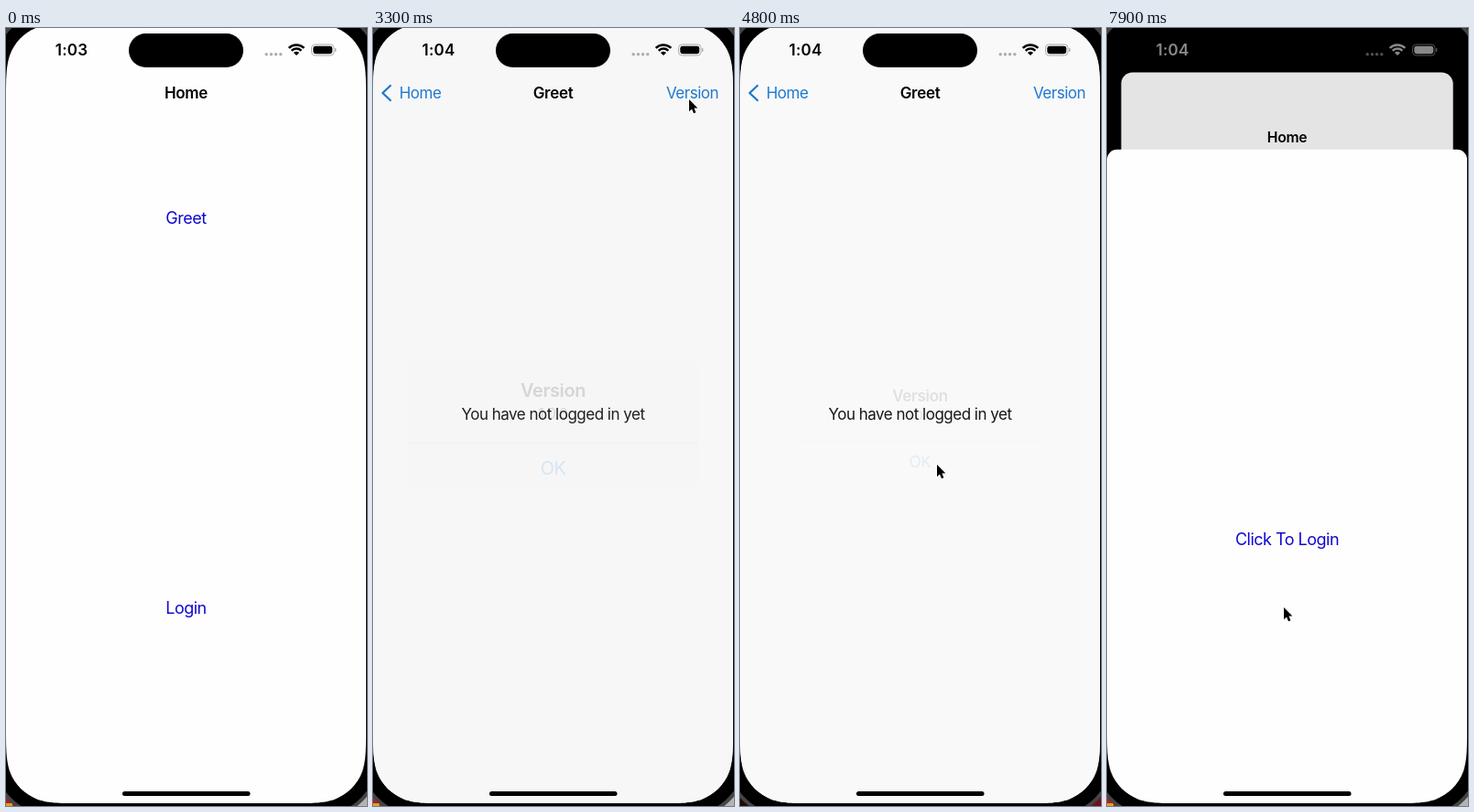
Animation, 394 px wide and 850 px high, one loop 8 s. Source, as an HTML page with a canvas:

```html
<!DOCTYPE html>
<html lang="en">
<head>
<meta charset="utf-8">
<title>Phone navigation</title>
<style>
  html, body { margin: 0; width: 100%; height: 100%; overflow: hidden; background: #000; }
  canvas { display: block; width: 100%; height: 100%; }
</style>
</head>
<body>
<canvas id="stage" width="394" height="850"></canvas>
<script>
const ctx = document.getElementById('stage').getContext('2d');
const W = 394, H = 850, LOOP = 8000, STEP = 100, MID = 196.5;
const BLACK = [0, 0, 0], BLUE = [18, 122, 222], LINK = [16, 8, 208], TINT_OFF = [112, 112, 118];
const PUSH = 1148, ALERT = 3265, DISMISS = 4586, POP = 6015, SHEET = 7675;

const gray = v => [v, v, v];
const PAPER = gray(254);
const lerp = (a, b, p) => a + (b - a) * p;
const mix = (a, b, p) => a.map((v, i) => lerp(v, b[i], p));
const css = c => `rgb(${c.map(Math.round)})`;
const ease = p => p * p * (3 - 2 * p);

// Critically damped spring running from 0 to 1
function spring(t, start) {
  const x = Math.max(0, t - start) / 1000 * 18.26;
  return 1 - (1 + x) * Math.exp(-x);
}

// Pointer path: time, x, y
const PATH = [
  [400, 410, 330], [1000, 196, 197], [1400, 196, 197], [1900, 156, 197],
  [2300, 156, 197], [3100, 345, 78], [3500, 345, 78], [4400, 215, 477],
  [4800, 215, 477], [5800, 57, 73], [6100, 57, 73], [6800, 145, 600],
  [7000, 145, 600], [7500, 193, 633], [8000, 193, 633]
];

function pointerAt(t) {
  const i = PATH.findIndex(p => p[0] >= t);
  if (i < 1) return null;
  const [a, b] = [PATH[i - 1], PATH[i]];
  const p = ease((t - a[0]) / (b[0] - a[0]));
  return [lerp(a[1], b[1], p), lerp(a[2], b[2], p)];
}

function box(x, y, w, h, r, fill) {
  ctx.beginPath();
  ctx.roundRect(x, y, w, h, r);
  if (fill) {
    ctx.fillStyle = fill;
    ctx.fill();
  }
}

// Rounded rectangle whose corners blend smoothly into the sides
function smoothBox(x, y, w, h, r) {
  const curve = [[1.529, 0], [1.088, 0], [0.868, 0], [0.631, 0.075], [0.373, 0.169]];
  const corner = (cx, cy, sx, sy, flip) => {
    let pts = [...curve, ...curve.map(([a, b]) => [b, a]).reverse()];
    if (flip) pts.reverse();
    pts = pts.map(([a, b]) => [cx + sx * a * r, cy + sy * b * r]);
    ctx.lineTo(...pts[0]);
    for (let i = 1; i < pts.length; i += 3) {
      ctx.bezierCurveTo(...pts[i], ...pts[i + 1], ...pts[i + 2]);
    }
  };
  ctx.beginPath();
  corner(x, y, 1, 1, true);
  corner(x + w, y, -1, 1, false);
  corner(x + w, y + h, -1, -1, true);
  corner(x, y + h, 1, -1, false);
  ctx.closePath();
}

function line(points, color, width) {
  ctx.beginPath();
  points.forEach(p => ctx.lineTo(...p));
  ctx.strokeStyle = color;
  ctx.lineWidth = width;
  ctx.lineCap = ctx.lineJoin = 'round';
  ctx.stroke();
}

function label(str, x, y, color, { size = 17, weight = 400, alpha = 1, space = -0.5 } = {}) {
  if (alpha <= 0) return;
  ctx.save();
  ctx.globalAlpha *= Math.min(1, alpha);
  ctx.font = `${weight} ${size}px Inter, sans-serif`;
  ctx.letterSpacing = `${space}px`;
  ctx.textAlign = 'center';
  ctx.fillStyle = css(color);
  ctx.fillText(str, x, y + size * 0.36);
  ctx.restore();
}

const title = (str, x, y, alpha = 1) =>
  label(str, x, y, BLACK, { weight: 600, space: -0.3, alpha });

const link = (str, x, y) => label(str, x, y, LINK, { size: 18 });

function homePage(x, fill) {
  ctx.fillStyle = css(fill);
  ctx.fillRect(0, -5, W, H + 5);
  link('Greet', x + MID, 208);
  link('Login', x + MID, 634);
}

function greetPage(x, fill) {
  ctx.fillStyle = css(fill);
  ctx.fillRect(x, -5, W, H + 5);
  label('You have not logged in yet', x + MID, 421.5, BLACK);
}

// p: visibility of the second page, q: position of the titles
function navBar(p, q, tint, y) {
  const homeX = lerp(MID, 51.5, q);
  title('Home', homeX, y, 1 - 3 * p * p);
  if (p < 0.001) return;
  label('Home', homeX, y, tint, { alpha: 1.3 * p * p });
  title('Greet', MID + 139 * (1 - q), y, 2.6 * p ** 3);
  label('Version', 348.5, y, tint, { alpha: 2 * p * p });
  ctx.globalAlpha = p ** 1.2;
  line([[19, 63], [10.5, 71], [19, 79]], css(tint), 2.3);
  ctx.globalAlpha = 1;
}

function alertBox(p, scale) {
  if (p < 0.005) return;
  ctx.save();
  ctx.globalAlpha = p * 0.96;
  ctx.translate(MID, 433.5);
  ctx.scale(scale, scale);
  box(-135, -61.5, 270, 123, 13, css(gray(238)));
  ctx.globalAlpha = p;
  ctx.fillStyle = css(gray(204));
  ctx.fillRect(-135, 17, 270, 1);
  title('Version', 0, -32);
  label('1.0.0', 0, -10.5, BLACK, { size: 13, space: -0.2 });
  label('OK', 0, 40.5, BLUE);
  ctx.restore();
}

function statusBar(clock, ink, faint) {
  const color = css(ink);
  label(clock, 71.5, 24, ink, { size: 17, weight: 600, space: 0.2 });
  for (let i = 0; i < 4; i++) box(282.5 + i * 5.2, 27, 3.4, 3.4, 1.7, css(faint));
  const apex = [317, 30], half = 0.8;
  for (const r of [11.6, 7.4]) {
    ctx.beginPath();
    ctx.arc(...apex, r, -Math.PI / 2 - half, -Math.PI / 2 + half);
    ctx.strokeStyle = color;
    ctx.lineWidth = 2.5;
    ctx.lineCap = 'butt';
    ctx.stroke();
  }
  ctx.beginPath();
  ctx.moveTo(...apex);
  ctx.arc(...apex, 4.3, -Math.PI / 2 - half, -Math.PI / 2 + half);
  ctx.fillStyle = color;
  ctx.fill();
  box(333.5, 18, 24.5, 12, 3.8);
  ctx.strokeStyle = css(faint);
  ctx.lineWidth = 1;
  ctx.stroke();
  box(335.3, 19.8, 20.9, 8.4, 2.4, color);
  box(359, 22, 1.4, 4, 0.7, css(faint));
}

function bezel(t) {
  const lit = t < 500 || (t >= 3300 && t < 4200) || t >= 7500;
  ctx.fillStyle = '#202020';
  ctx.fillRect(0, 0, W, H);
  ctx.fillStyle = lit ? '#b02018' : '#200a0a';
  ctx.fillRect(0, 800, 60, 50);
  ctx.fillStyle = lit ? '#b4b4b4' : '#701018';
  ctx.fillRect(334, 800, 60, 50);
  if (lit) {
    ctx.fillStyle = '#d8a030';
    ctx.fillRect(0, 847, 7, 3);
  }
  box(-19, -24, 431, 890, 75, '#444');
  box(-15, -20, 423, 882, 71, '#000');
}

function pointer(pos) {
  if (!pos) return;
  ctx.save();
  ctx.translate(...pos);
  ctx.beginPath();
  for (const p of [[0, 0], [0, 13.2], [3, 10.5], [5, 15.2], [7.4, 14.2], [5.4, 9.6], [9.4, 9.4]]) ctx.lineTo(...p);
  ctx.closePath();
  ctx.strokeStyle = '#fff';
  ctx.lineWidth = 2;
  ctx.lineJoin = 'round';
  ctx.stroke();
  ctx.fillStyle = '#000';
  ctx.fill();
  ctx.restore();
}

function screen(t) {
  const popping = t >= POP;
  const move = spring(t, popping ? POP : PUSH);
  const slide = move ** 1.2;
  const shown = popping ? 1 - move : move;
  const q = popping ? 1 - slide : slide;
  const hiding = t >= DISMISS;
  const alert = hiding ? 1 - spring(t, DISMISS) : spring(t, ALERT);
  const sheet = spring(t, SHEET);

  // The home page recedes while the sheet rises
  const k = 1 - 0.085 * sheet;
  ctx.fillStyle = '#000';
  ctx.fillRect(0, -5, W, H + 5);
  ctx.save();
  ctx.translate(MID * (1 - k), 53.3 * sheet);
  ctx.scale(k, k);
  if (sheet > 0) {
    box(0, -5 * (1 - sheet), 393, H, lerp(55, 10, sheet));
    ctx.clip();
  }
  homePage(-118 * shown, gray(254 - 40 * shown - 28 * sheet));
  if (shown > 0.001) greetPage(W * (1 - shown), mix(PAPER, gray(203), alert));
  navBar(shown, q, mix(BLUE, TINT_OFF, alert), 71 + 5.4 * sheet);
  ctx.restore();

  alertBox(alert, hiding ? 1 : 1 + 0.2 * (1 - alert));

  if (sheet > 0) {
    const top = lerp(H, 67, sheet);
    box(0, top, 393, H, 11, css(PAPER));
    link('Click To Login', MID, top + 426);
  }
  statusBar(t < 500 ? '1:03' : '1:04', gray(150 * sheet), gray(lerp(172, 72, sheet)));
}

function draw(t) {
  bezel(t);
  ctx.save();
  smoothBox(0, -5, 393, 852, 55);
  ctx.clip();
  screen(t);
  ctx.restore();
  box(134, 6, 125, 37, 18.5, '#000');
  box(127, 834, 139.5, 5, 2.5, '#000');
  pointer(pointerAt(t));
}

function tick() {
  const t = performance.now() % LOOP;
  draw(Math.floor(t / STEP) * STEP);
  requestAnimationFrame(tick);
}
tick();
</script>
</body>
</html>
```
